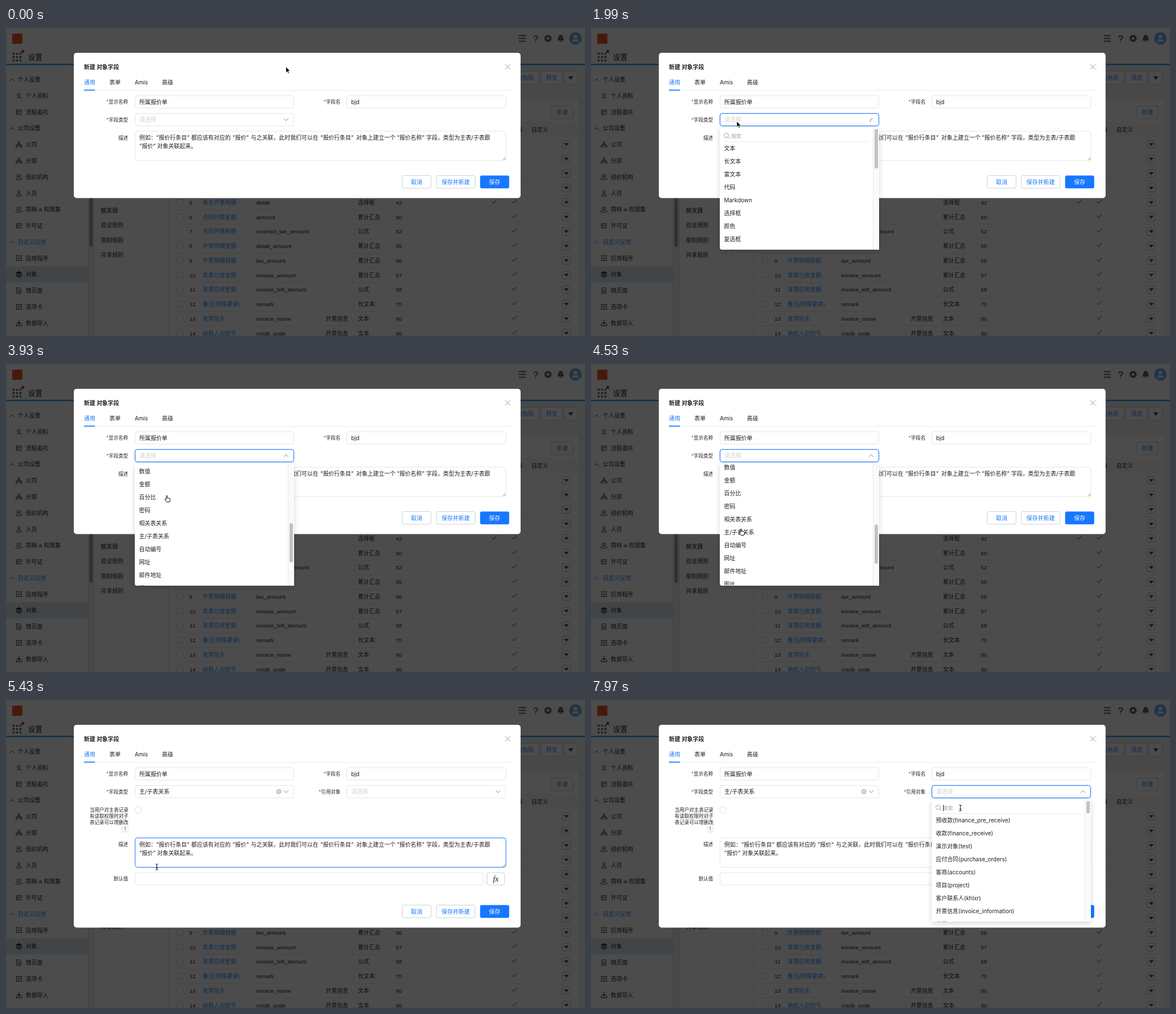
Animation, 1025 px wide and 546 px high, one loop 8 s. Source, as an HTML page:

```html
<!DOCTYPE html>
<html lang="zh-CN">
<head>
<meta charset="utf-8">
<style>
  html, body { margin: 0; height: 100%; overflow: hidden; background: #4d4d4d; }
  svg { display: block; width: 1025px; height: 546px; }
  text { white-space: pre; }
  #page { font-family: "Liberation Sans", "Noto Sans CJK SC", "Noto Sans CJK", sans-serif; }
  #dialog { font-family: Inter, "Noto Sans CJK SC", "Noto Sans CJK", sans-serif; }
</style>
</head>
<body>
<svg viewBox="0 0 1025 546">
  <defs>
    <filter id="shadow" x="-20%" y="-20%" width="140%" height="140%">
      <feDropShadow dx="0" dy="3" stdDeviation="5" flood-opacity=".16"/>
    </filter>
  </defs>
  <g id="page"></g>
  <rect width="1025" height="546" opacity=".7"/>
  <g id="dialog"></g>
  <g id="cursor"></g>
</svg>
<script>
const BLUE = '#1677ff', LINK = '#1f90ff', INK = '#1f1f1f', LINE = '#e3e5e8', EDGE = '#c6d2e2', HINT = '#cfcfcf';
const EM = 9.96, SMALL = 8.54;
const $ = id => document.getElementById(id);

// Text is placed by the middle of its line.
const text = (x, mid, s, fill = INK, size = EM, more = '') =>
  `<text x="${x}" y="${mid + size * .37}" fill="${fill}" font-size="${size}" ${more}>${s}</text>`;
const centered = (x, mid, s, fill, size) => text(x, mid, s, fill, size, 'text-anchor="middle"');
const rect = (x, y, w, h, fill, stroke = 'none', r = 0) =>
  `<rect x="${x}" y="${y}" width="${w}" height="${h}" rx="${r}" fill="${fill}" stroke="${stroke}"/>`;
const path = (d, stroke, width = 1, fill = 'none') =>
  `<path d="${d}" stroke="${stroke}" stroke-width="${width}" fill="${fill}" stroke-linecap="round" stroke-linejoin="round"/>`;
const circle = (x, y, r, fill, stroke = 'none') =>
  `<circle cx="${x}" cy="${y}" r="${r}" fill="${fill}" stroke="${stroke}"/>`;
const at = (x, y, s) => `<g transform="translate(${x} ${y})">${s}</g>`;
const chevron = (x, y, up, color = '#8c8c8c') => path(`M${x - 3.6} ${y + (up ? 2 : -2)}l3.6 ${up ? -4 : 4} 3.6 ${up ? 4 : -4}`, color);

function dots(step, r, color) {
  let s = '';
  for (let i = 0; i < 9; i++) s += circle((i % 3 - 1) * step, ((i / 3 | 0) - 1) * step, r, color);
  return s;
}

// ---------- page behind the dialog ----------
const GREY = '#3c3c3c', TOOL = '#666';
const person = circle(0, -2.4, 2.2, 'none', GREY) + path('M-4 4.5Q-4 .8 0 .8T4 4.5Z', GREY);
const icons = {
  person,
  user: path('M-3.5 4.5Q-3.5 1 0 1M2 1.5v3M.5 3h3', GREY) + circle(-.5, -2.2, 2.3, 'none', GREY),
  sheet: path('M-4-4H4V4H-4ZM-4-1H4M-1.5-1V4', GREY),
  tree: path('M-1.5-4.5h3v3h-3zM-5 1.5h3v3h-3zM2 1.5h3v3H2zM0-1.5V0M-3.5 1.5V0h7v1.5', GREY),
  people: at(-1.5, 0, person) + path('M2-4.2a2 2 0 0 1 0 3.8M4 1.2q2 1 2 3.3', GREY),
  grid: dots(4, 1.3, GREY),
  layers: path('M0-5 5.2-2.5 0 0-5.2-2.5Z', GREY, 1, GREY) + path('M-5 .3 0 2.7 5 .3M-5 2.7 0 5.1 5 2.7', GREY, 1.3),
  page: path('M-3.5-5H1.5L3.5-3V5H-3.5ZM-1.5-1.5h3M-1.5 .5h3M-1.5 2.5h3', GREY),
  load: path('M0-5V1.5M-2.5-.8 0 1.7 2.5-.8M-4.8 1V4.5H4.8V1', GREY, 1.2),
};
const menu = [
  ['个人设置'], ['个人资料', 'user'], ['流程委托', 'sheet'],
  ['公司设置'], ['公司', 'tree'], ['分部', 'tree'], ['组织机构', 'people'], ['人员', 'person'],
  ['简档 &amp; 权限集', 'people'], ['许可证', 'sheet'],
  ['自定义应用'], ['应用程序', 'grid'], ['对象', 'layers'], ['微页面', 'page'], ['选项卡', 'grid'], ['数据导入', 'load'],
];
const fields = [
  ['有无开票明细', 'detail', '', '选择框', 42],
  ['合同开票金额', 'amount', '', '累计汇总', 50],
  ['合同开票税额', 'contract_tax_amount', '', '公式', 52],
  ['开票明细金额', 'detail_amount', '', '累计汇总', 55],
  ['开票明细税额', 'tax_amount', '', '累计汇总', 56],
  ['发票已收金额', 'invoice_amount', '', '累计汇总', 57],
  ['发票应收金额', 'invoice_left_amount', '', '公式', 58],
  ['备注(特殊要求)', 'remark', '', '长文本', 70],
  ['发票抬头', 'invoice_name', '开票信息', '文本', 80],
  ['纳税人识别号', 'credit_code', '开票信息', '文本', 90],
];

function header() {
  const tools = path('M908.5 13.5h11M908.5 18.5h11M908.5 23.5h11', TOOL, 1.8)
    + text(932.5, 18.5, '?', TOOL, 17, 'font-weight="700"')
    + `<circle cx="959.5" cy="18.5" r="4" fill="none" stroke="${TOOL}" stroke-width="3.4"/>`
    + `<circle cx="959.5" cy="18.5" r="5.8" fill="none" stroke="${TOOL}" stroke-width="1.6" stroke-dasharray="2.6 1.95"/>`
    + path('M976.5 21.5q2-1.5 2-5a3.5 3.5 0 0 1 7 0q0 3.5 2 5zM980.8 23.8h2.4', TOOL, 1.4, TOOL);
  return rect(0, 0, 1025, 64, '#fff') + rect(0, 63.5, 1025, 2.3, '#1e9cf5')
    + rect(11, 10, 18, 18, '#f35325') + at(19.5, 51.5, dots(6, 1.9, TOOL)) + circle(29.5, 41.5, 2.8, '#ff2a2a')
    + text(39, 51.5, '设置', '#181818', 12.7) + tools
    + circle(1008, 18.5, 11, '#70b4f5') + circle(1008, 15.5, 3.6, '#e4f0ff') + path('M1002 24.5q0-4.5 6-4.5t6 4.5z', 'none', 0, '#e4f0ff');
}

function sidebar() {
  let s = rect(0, 65.8, 145, 481, '#fff') + rect(0, 422, 145, 29, '#dfe8f2')
    + rect(145, 66, 1, 480, '#ddd') + rect(147.5, 70, 6, 318, '#a0a0a0', 'none', 3) + rect(155, 66, 1, 480, '#ddd');
  menu.forEach(([name, icon], i) => {
    const y = 91.5 + 28.77 * i, color = name === '自定义应用' ? LINK : '#222';
    s += icon ? at(23, y, icons[icon]) + text(35, y, name, '#222') : chevron(10, y + .5, true, color) + text(21, y, name, color);
  });
  return s;
}

function table() {
  const button = (x, y, w, label) => rect(x, y, w, 23, '#fff', '#ccc', 3) + centered(x + w / 2, y + 11.5, label, LINK);
  const tick = (x, y) => path(`M${x - 4} ${y}l2.7 2.8 5.2-6`, GREY);
  let s = rect(156, 125, 859, 421, '#fff', '#ddd', 3) + rect(288, 125, 1, 421, '#ddd')
    + rect(295, 167, 720, 26, '#fafafa') + text(930, 180.5, '自定义', '#222', EM, 'font-weight="500"') + text(904, 180.5, '填', '#222')
    + button(880, 77, 63, '') + text(914, 88.5, '布局', LINK) + text(904, 88.5, '面', LINK)
    + button(947, 77, 38, '预览') + button(988.5, 77, 23, '') + path('M996 86h8l-4 5.5z', '#444', .5, '#444')
    + button(966, 138, 38, '新建');
  ['触发器', '验证规则', '限制规则', '共享规则'].forEach((name, i) => s += text(168, 323 + 26.6 * i, name, '#222'));
  for (let row = 1; row <= 14; row++) {
    const y = 309.3 + 25.74 * (row - 5), field = fields[row - 5];
    s += rect(295, y + 12.5, 720, 1, '#efefef') + rect(984.5, y - 7, 14.5, 14, '#fff', '#bbb', 3)
      + path(`M988.5 ${y - 2}h7l-3.5 4.5z`, '#444', .5, '#444');
    if (!field) continue;
    const [name, key, group, type, order] = field;
    s += rect(302.5, y - 5.5, 11, 11, '#fff', '#dcdcdc', 2) + centered(327.3 + (row > 9 ? 3 : 0), y, row, '#222')
      + text(348, y, name, LINK) + text(443, y, key, '#222') + text(566, y, group, '#222')
      + text(623, y, type, '#222') + text(690, y, order, '#222') + tick(900, y - 1.5);
    if (row === 5) s += tick(864.5, y - 1.5);
  }
  return s;
}

$('page').innerHTML = rect(0, 0, 1025, 546, '#f3f3f3') + table() + sidebar() + header();

// ---------- dialog ----------
const types = ('文本 长文本 富文本 代码 Markdown 选择框 颜色 复选框 开关 日期 日期时间 时间 数值 金额 百分比 密码 '
  + '相关表关系 主/子表关系 自动编号 网址 邮件地址 图片 文件').split(' ');
const objects = ('预收款(finance_pre_receive) 收款(finance_receive) 演示对象(test) 应付合同(purchase_orders) '
  + '客商(accounts) 项目(project) 客户联系人(khlxr) 开票信息(invoice_information) 发票(invoice)').split(' ');
const description = [[236, '例如：'], [266, '“报价行条目“'], [328, '都应该有对应的'], [401, '“报价“'], [433.5, '与之关联，此时我们可以在'],
  [556.5, '“报价行条目“'], [620, '对象上建立一个'], [692, '“报价名称“'], [744, '字段，类型为主表/子表跟']];

const box = (x, y, w, h, stroke = LINE) => rect(x, y, w, h, '#fff', stroke, 4);
const label = (x, y, s, required) =>
  text(x, y, (required ? '<tspan fill="#f23030">*</tspan>' : '') + s, INK, SMALL, 'text-anchor="end"');
const spinner = x => path(`M${x - 2} 166v-2q0-3 4-3.2`, '#888', 1.1);

function select(x, value, { hot, open, busy }) {
  const glow = open ? rect(x - 1, 150.5, 283.5, 24.5, '#d6e6ff', 'none', 5) : '';
  let s = glow + box(x + .5, 151.5, 281, 22, hot || open ? BLUE : LINE) + text(x + 8, 162.5, value || '请选择', value ? INK : HINT);
  if (value) s += circle(x + 255, 162.5, 4.6, '#c4c4c4') + path(`M${x + 253.4} 160.9l3.2 3.2m0-3.2l-3.2 3.2`, '#fff', .9);
  return s + (busy ? spinner(x + 268.5) : chevron(x + 268, 162.5, open));
}

function dropdown(x, options, scroll, thumb, caret) {
  let list = circle(x + 11.5, 190.5, 3.9, 'none', '#999') + path(`M${x + 14.5} 193.5l2.6 2.6`, '#999')
    + text(x + 20, 191.5, '搜索', '#a8a8a8', 9) + rect(x + 8, 201, 256, 1, '#ececec');
  if (caret) list += rect(x + 20.5, 186, 1, 11, '#111');
  options.forEach((name, i) => list += text(x + 7.5, 213 + 23.03 * i, name));
  return `<clipPath id="list"><rect x="${x}" y="177.5" width="282" height="215"/></clipPath>`
    + `<g filter="url(#shadow)">${rect(x, 177, 282, 216, '#fff', 'none', 4)}</g>`
    + `<g clip-path="url(#list)">${at(0, -scroll, list)}</g>`
    + rect(x + 271.5, 177, 10.5, 216, '#fafafa') + rect(x + 271, 177, 1, 216, '#e8e8e8')
    + rect(x + 274, 179 + scroll * .344, 6, thumb, '#c2c2c2', 'none', 3);
}

function textarea(y, hot) {
  const line = description.map(([x, s]) => `<tspan x="${x}">${s}</tspan>`).join('');
  return label(216, y + 11.5, '描述') + box(228.5, y, 656.5, 52, hot ? BLUE : LINE)
    + text(236, y + 11.5, line) + text(236, y + 26.8, '“报价“ 对象关联起来。')
    + path(`M879.5 ${y + 51}l4.5-4.5M882.3 ${y + 51}l1.7-1.7`, '#888', .9);
}

function buttons(y) {
  return rect(701.5, y, 51, 22.5, '#fff', EDGE, 3) + centered(727, y + 11.5, '取消', BLUE)
    + rect(762, y, 68.5, 22.5, '#fff', EDGE, 3) + centered(796, y + 11.5, '保存并新建', BLUE)
    + rect(839.3, y, 51.5, 22.7, BLUE, 'none', 3) + centered(865, y + 11.5, '保存', '#fff');
}

function masterFields(t) {
  const lines = ['当用户对主表记录', '有读取权限时对子', '表记录可以增删改'];
  return label(592, 162.5, '引用对象', true) + select(603, '', { hot: t >= 6480, open: t >= 7080, busy: t >= 7080 && t < 7230 })
    + lines.map((s, i) => label(216.5, 194.5 + 11.2 * i, s)).join('')
    + rect(206, 224, 10, 10, '#fff', '#dcdcdc', 1) + centered(211, 229, '!', INK, 9)
    + rect(228.5, 189.5, 10.5, 10.5, '#fff', '#e0e0e0', 2)
    + label(216, 317, '默认值') + box(228.5, 306, 616.5, 22)
    + rect(851.5, 306, 31, 22, '#fff', EDGE, 3)
    + text(867, 317, 'fx', '#222', 14, 'text-anchor="middle" font-style="italic" font-family="Liberation Serif, serif"');
}

function dialog(t, scroll) {
  const chosen = t >= 4980, expanded = t >= 5430, open = t >= 1990 && !chosen;
  let s = rect(120, 44, 791, expanded ? 359.5 : 257.5, '#fff', 'none', 5)
    + text(138, 69, '新建 对象字段', INK, EM, 'font-weight="600"') + path('M884 64.5l8.5 8.5m0-8.5l-8.5 8.5', '#999')
    + rect(138, 110, 756, 1, '#ececec') + rect(138, 109.3, 19.5, 1.7, BLUE)
    + text(138, 96.5, '通用', BLUE) + text(183, 96.5, '表单') + text(228, 96.5, 'Amis') + text(276, 96.5, '高级')
    + label(216, 131, '显示名称', true) + box(228.5, 120, 281, 22) + text(236, 131, '所属报价单')
    + label(592, 131, '字段名', true) + box(603.5, 120, 281.5, 22) + text(611, 131, 'bjd')
    + label(216, 162.5, '字段类型', true)
    + select(228, chosen ? '主/子表关系' : '', { hot: t >= 1390 && !chosen, open, busy: open && t < 2140 })
    + textarea(expanded ? 244.5 : 183, expanded && t < 6030) + buttons(expanded ? 363.5 : 261.5);
  if (expanded) s += masterFields(t);
  if (open) s += dropdown(228, types, scroll, 70);
  if (t >= 7080) s += dropdown(603, objects, 0, 22, t >= 7670);
  return s;
}

// ---------- motion ----------
const pointers = {
  arrow: path('M0 0v10.2l2.4-2.2 1.7 3.8 1.7-.8-1.6-3.6h3.2z', '#fff', .8, '#000'),
  hand: path('M-2.2.5V-4.6a1 1 0 0 1 2 0V-1.2q1-.6 1.8.2 1-.5 1.7.3 1.4-.2 1.4 1V2.6L3.4 5.6H-1.6L-4.8 1.2q-.3-1.2 1-1.1z', '#000', 1, '#fff'),
  beam: path('M-2-5.2Q0-5.2 0-4Q0-5.2 2-5.2M0-4V4M-2 5.2Q0 5.2 0 4Q0 5.2 2 5.2M-1.2 1.5h2.4', '#111', 1),
};
const cursorPath = [[350, 495.5, 69], [1100, 320, 178], [1540, 258, 165.5], [1990, 258, 165.5], [2590, 282, 232], [3180, 282, 232],
  [3930, 286, 239], [4080, 286, 240], [4530, 267, 298], [4980, 267, 296], [5430, 267, 296], [5880, 430, 265],
  [6180, 679, 148], [6630, 656, 164], [7080, 656, 164], [7820, 654, 191.5]];
const scrollPath = [[2440, 0], [3180, 147.3], [3930, 299.4], [4080, 304.5], [4530, 306]];

function track(keys, t) {
  const next = keys.findIndex(key => key[0] > t);
  if (next < 0) return keys.at(-1).slice(1);
  const b = keys[next], a = keys[next - 1] || b;
  const k = a === b ? 0 : (t - a[0]) / (b[0] - a[0]);
  return a.slice(1).map((v, i) => v + (b[i + 1] - v) * k);
}

function stepTime(t) {
  if (t < 500) return 0;
  const slip = 50 - 10 * ((t >= 1540) + (t >= 3030) + (t >= 7970));
  return Math.floor((t - slip) / 150) * 150 + slip;
}

let shown = -1;
function frame(now) {
  const t = stepTime(now % 8000);
  if (t !== shown) {
    shown = t;
    const kind = t < 2290 ? 'arrow' : t < 4980 ? 'hand' : t < 6030 ? 'beam' : t < 7380 ? 'arrow' : 'beam';
    $('dialog').innerHTML = dialog(t, track(scrollPath, t)[0]);
    $('cursor').innerHTML = at(...track(cursorPath, t), pointers[kind]);
  }
  requestAnimationFrame(frame);
}
frame(0);
</script>
</body>
</html>
```
